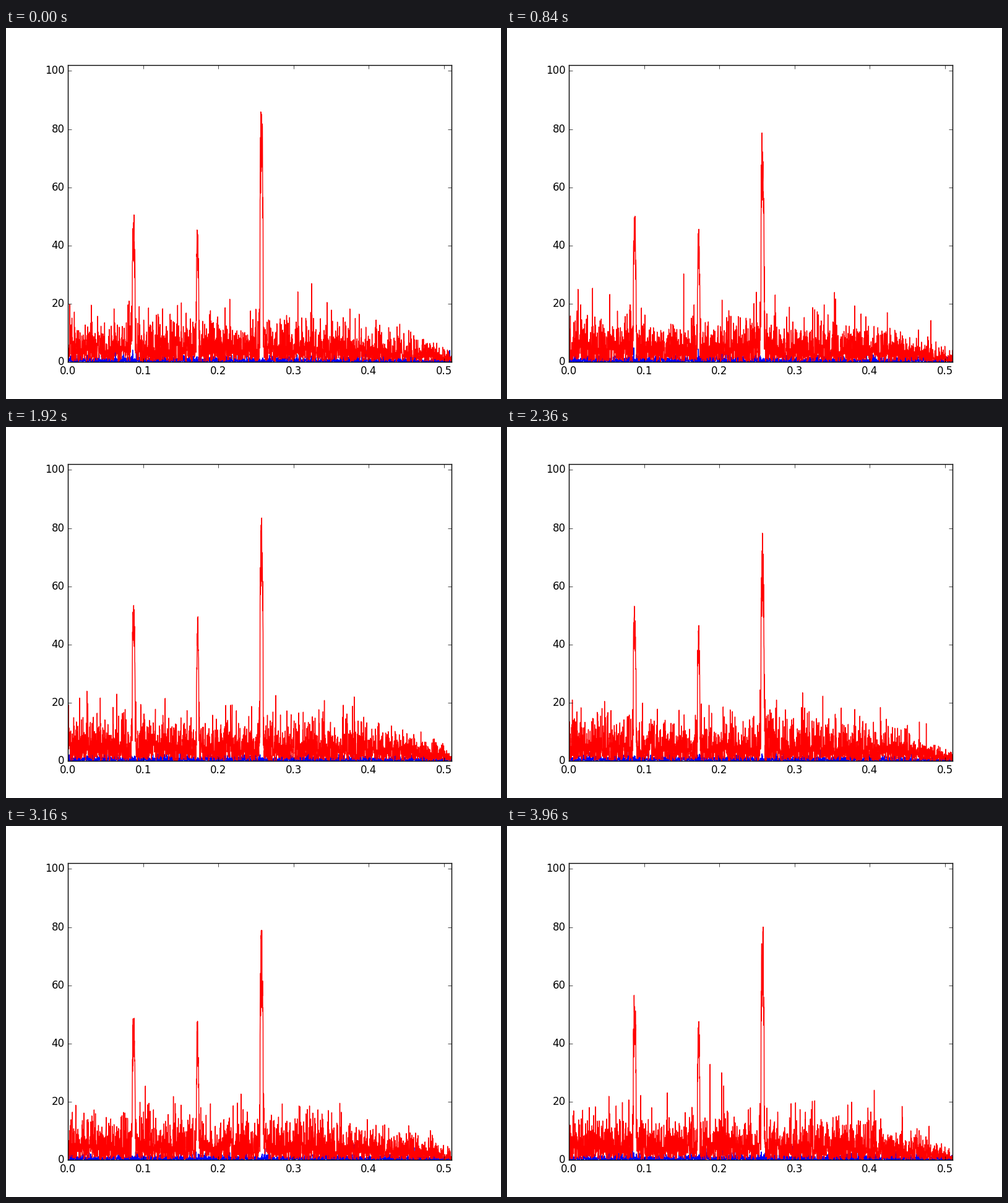
Animation of 800x600 px, one loop 4 s. Source, as a matplotlib script:

```python
import matplotlib.pyplot as plt
import numpy as np
from matplotlib.animation import FuncAnimation

plt.style.use("classic")
plt.rcParams["font.family"] = "DejaVu Sans"

FRAMES, INTERVAL = 100, 40
X = np.linspace(0, 0.51, 2560)
ROLLOFF = 1 - (X / 0.53) ** 6

# harmonics: center, half width, mean height
PEAKS = ((0.0874, 0.0019, 52.8), (0.1724, 0.0016, 46.2), (0.2574, 0.0021, 79))


def add_peak(red, rng, center, width, mean):
    u = np.abs(X - center) / width
    height = mean * rng.normal(1, 0.055)

    skirt = (u > 1) & (u < 1.6)
    red[skirt] += height * 0.2 * rng.random(skirt.sum())

    core = u <= 1
    dome = (1 - 0.35 * u[core] ** 2) * rng.uniform(0.65, 1, core.sum())
    red[core] = height * dome / dome.max()


def spectrum(step):
    rng = np.random.default_rng(100 + step)
    blue = rng.exponential(0.6, X.size) * ROLLOFF ** 0.3
    red = 5.5 * rng.weibull(1.3, X.size) * ROLLOFF
    red[0] = rng.uniform(8, 20)
    for peak in PEAKS:
        add_peak(red, rng, *peak)
    return blue, red


fig = plt.figure(figsize=(8, 6), dpi=100, facecolor="white")
ax = fig.add_subplot(111)
blue_line, = ax.plot([], [], color="blue")
red_line, = ax.plot([], [], color="red")
ax.set_xlim(0, 0.51)
ax.set_ylim(0, 102)


def draw(step):
    blue, red = spectrum(step)
    blue_line.set_data(X, blue)
    red_line.set_data(X, red)
    return blue_line, red_line


anim = FuncAnimation(fig, draw, frames=FRAMES, interval=INTERVAL,
                     init_func=lambda: draw(0), repeat=True, repeat_delay=0)
plt.show()
```
